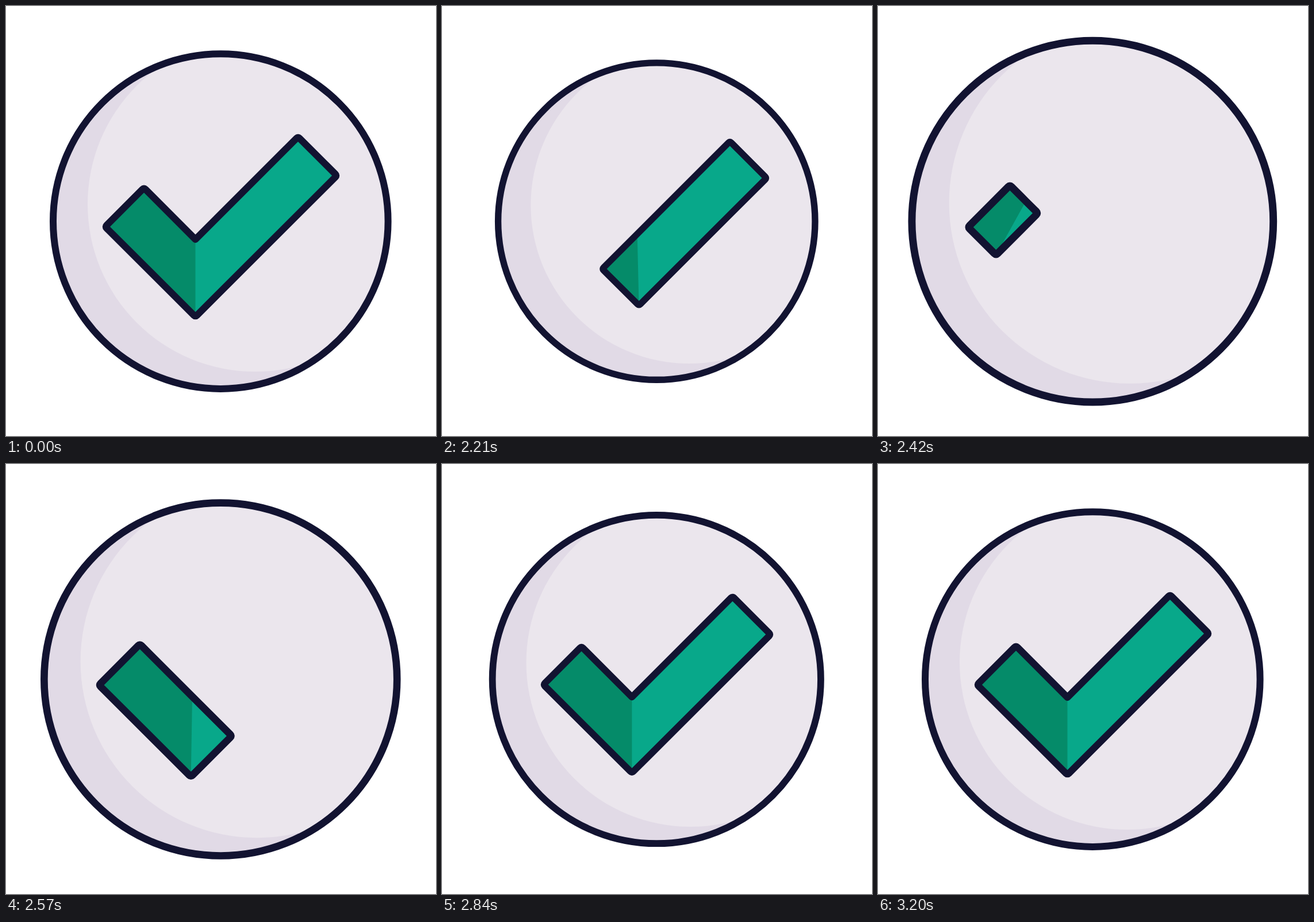
An HTML page for the animation above (3230 ms loop, 748x748 px).

```html
<!DOCTYPE html>
<html lang="en">
<head>
<meta charset="utf-8">
<title>Check mark</title>
<style>
  html, body { margin: 0; width: 100%; height: 100%; overflow: hidden; background: #fff; }
  svg { display: block; width: 100%; height: 100%; }
</style>
</head>
<body>
<svg viewBox="0 0 748 748">
  <defs>
    <clipPath id="disc"><circle cx="373.3" cy="374.6" r="291.3"/></clipPath>
  </defs>
  <g id="badge">
    <circle cx="373.3" cy="374.6" r="291.3" fill="#e1dae6"/>
    <circle cx="433.3" cy="344.8" r="291.3" fill="#ebe6ed" clip-path="url(#disc)"/>
    <circle cx="373.3" cy="374.6" r="291.3" fill="none" stroke="#121331" stroke-width="12"/>
    <path id="fill" fill="#08a88a"/>
    <path id="shade" fill="#058b69"/>
    <path id="line" fill="none" stroke="#121331" stroke-width="12" stroke-linejoin="round"/>
  </g>
</svg>
<script>
const LOOP = 3230, START = 2000, STEP = 30;
const CX = 373.3, CY = 374.6, ROUND = 3.5;
const el = id => document.getElementById(id);
const badge = el('badge'), fill = el('fill'), shade = el('shade'), line = el('line');

// Corners of the tick: left, upper left, notch, top, right, bottom
const L = [172.5, 384], A = [240, 316.3], N = [329.5, 405.9];
const T = [508, 227.5], R = [575.5, 295], B = [329.5, 540.6];
const P = [262, 473.4], C = [397, 473.2];

const full = [L, A, N, T, R, B];
const arm = [P, N, N, T, R, B];
const goneRight = [T, T, T, T, R, R];
const goneLeft = [L, A, A, A, A, L];
const elbow = [L, A, N, N, C, B];

const easeIn = k => u => Math.pow(u, k);
const easeOut = k => u => 1 - Math.pow(1 - u, k);
const smooth = u => u * u * (3 - 2 * u);

const morphs = [
  { t0: 2000, t1: 2190, from: full, to: arm, ease: easeIn(1.6) },
  { t0: 2190, t1: 2370, from: arm, to: goneRight, ease: easeIn(1.4) },
  { t0: 2370, t1: 2585, from: goneLeft, to: elbow, ease: easeOut(1.28) },
  { t0: 2585, t1: 2800, from: elbow, to: full, ease: easeOut(1.4) }
];
const scales = [[2000, 1], [2190, 0.944], [2445, 1.083], [2800, 0.98], [3200, 1]];

const mix = (a, b, u) => a + (b - a) * u;
const mixPoint = (p, q, u) => [mix(p[0], q[0], u), mix(p[1], q[1], u)];
const dist = (p, q) => Math.hypot(q[0] - p[0], q[1] - p[1]);
const str = p => p[0].toFixed(2) + ' ' + p[1].toFixed(2);

function scaleAt(t) {
  for (let i = 1; i < scales.length; i++) {
    const [t0, a] = scales[i - 1], [t1, b] = scales[i];
    if (t < t1) return mix(a, b, smooth(Math.max(0, (t - t0) / (t1 - t0))));
  }
  return 1;
}

function tickAt(t) {
  const m = morphs.find(m => t >= m.t0 && t < m.t1);
  if (!m) return full;
  const u = m.ease((t - m.t0) / (m.t1 - m.t0));
  return m.from.map((p, i) => mixPoint(p, m.to[i], u));
}

const sharp = pts => 'M' + pts.map(str).join('L') + 'Z';

// Softens outward corners only
function rounded(pts) {
  const n = pts.length, parts = [];
  pts.forEach((p, i) => {
    const a = pts[(i + n - 1) % n], b = pts[(i + 1) % n];
    const la = dist(p, a), lb = dist(p, b);
    const turn = ((p[0] - a[0]) * (b[1] - p[1]) - (p[1] - a[1]) * (b[0] - p[0])) / (la * lb || 1);
    if (turn < 0.3) {
      parts.push(str(p));
    } else {
      const into = mixPoint(p, a, Math.min(0.5, ROUND / la));
      const out = mixPoint(p, b, Math.min(0.5, ROUND / lb));
      parts.push(str(into) + 'Q' + str(p) + ' ' + str(out));
    }
  });
  return 'M' + parts.join('L') + 'Z';
}

function draw(ms) {
  const t = Math.max(START, START + STEP * Math.floor((ms % LOOP - START) / STEP));
  const pts = tickAt(t), s = scaleAt(t);
  badge.setAttribute('transform', `translate(${CX} ${CY}) scale(${s}) translate(${-CX} ${-CY})`);
  const edge = rounded(pts);
  fill.setAttribute('d', edge);
  line.setAttribute('d', edge);
  shade.setAttribute('d', sharp([pts[0], pts[1], pts[2], pts[5]]));
}

function frame() {
  draw(performance.now());
  requestAnimationFrame(frame);
}
draw(0);
requestAnimationFrame(frame);
</script>
</body>
</html>
```
